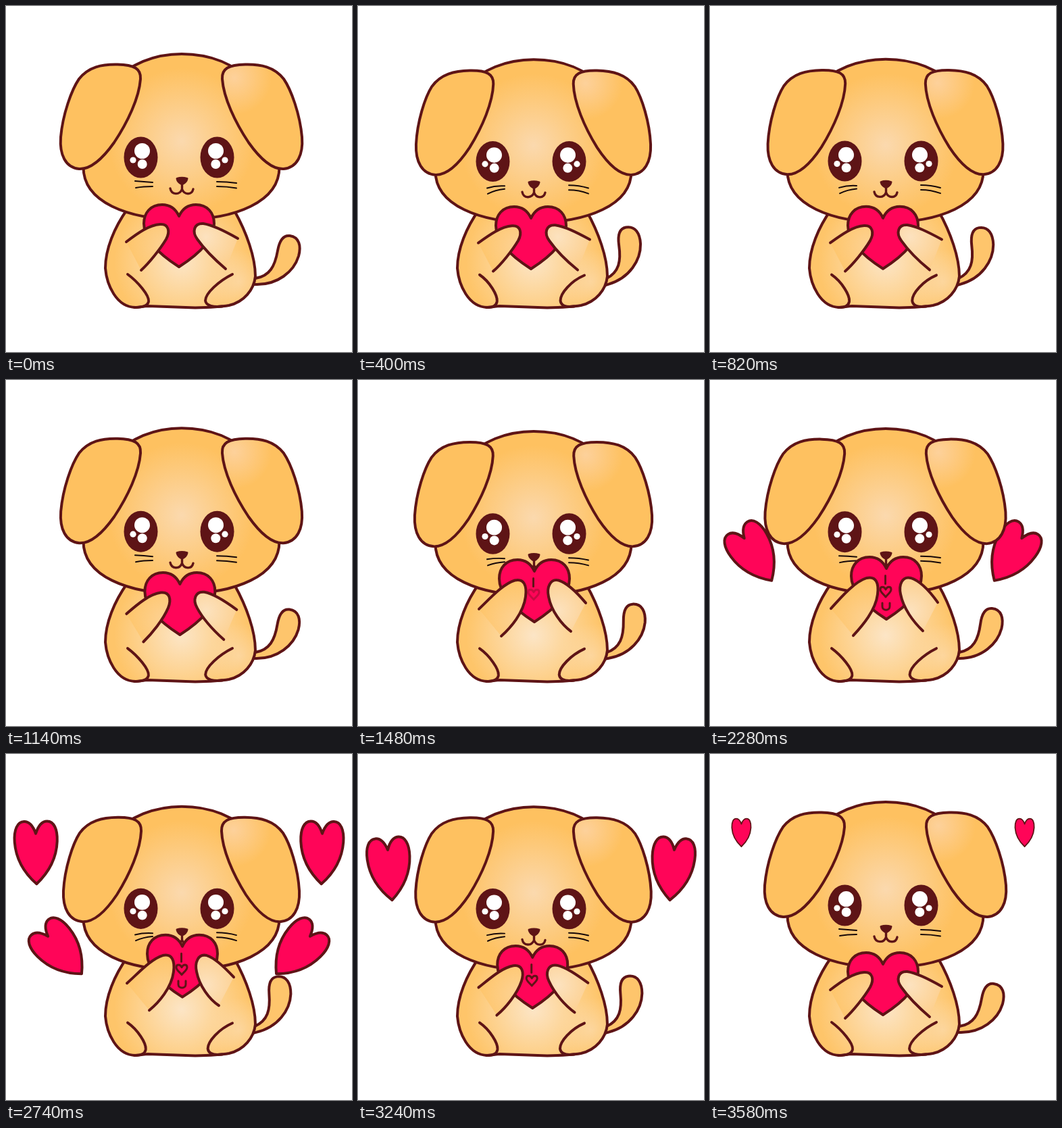
Write an HTML page with a canvas that moves like this. It is 512 by 512 pixels and loops after 3600 ms.

```html
<!DOCTYPE html>
<html lang="en">
<head>
<meta charset="utf-8">
<title>Puppy with a heart</title>
<style>
html, body { margin: 0; width: 100%; height: 100%; overflow: hidden; background: #fff; }
canvas { display: block; width: 100vw; height: 100vh; }
</style>
</head>
<body>
<canvas id="stage" width="512" height="512"></canvas>
<script>
const ctx = document.getElementById('stage').getContext('2d');
const LOOP = 3600, BOB = 1200;
const LINE = '#5e1416', PINK = '#ff0558', FUR = '#fec160', PALE = '#fbd9ae';

const clamp = v => Math.min(1, Math.max(0, v));
const ramp = (t, a, b) => clamp((t - a) / (b - a));
const ease = u => (1 - Math.cos(Math.PI * u)) / 2;
const mix = (a, b, u) => a + (b - a) * u;

function glow(x, y, r, inner = PALE, outer = FUR) {
  const g = ctx.createRadialGradient(x, y, 0, x, y, r);
  g.addColorStop(0, inner);
  g.addColorStop(1, outer);
  return g;
}

function draw(path, fill, width = 4, color = LINE) {
  const p = typeof path === 'string' ? new Path2D(path) : path;
  if (fill) { ctx.fillStyle = fill; ctx.fill(p); }
  if (width) { ctx.strokeStyle = color; ctx.lineWidth = width; ctx.stroke(p); }
}

function group(paint) {
  ctx.save();
  paint();
  ctx.restore();
}

function mirror(axis) {
  ctx.translate(axis * 2, 0);
  ctx.scale(-1, 1);
}

function dot(x, y, rx, ry, color) {
  ctx.fillStyle = color;
  ctx.beginPath();
  ctx.ellipse(x, y, rx, ry, 0, 0, Math.PI * 2);
  ctx.fill();
}

// Flying hearts: progress, x, y of the centre
const TRACK = [[0, 104, 345], [0.283, 81, 291], [0.4, 66, 258], [0.7, 46.5, 170],
               [0.783, 44.5, 146], [0.88, 46, 124], [1, 46.5, 115]];
const FLYER = new Path2D('M0,-28C-4,-40 -9,-46 -17,-46C-27,-46 -32.5,-34 -31.5,-16C-30,10 -17,31 0,46.5' +
                         'C17,31 30,10 31.5,-16C32.5,-34 27,-46 17,-46C9,-46 4,-40 0,-28Z');

function flyingPair(p) {
  if (p < 0 || p >= 1) return;
  const i = Math.max(1, TRACK.findIndex(k => k[0] > p));
  const a = TRACK[i - 1], b = TRACK[i], u = ramp(p, a[0], b[0]);
  const tilt = 46 * (1 - ease(ramp(p, 0.15, 0.85))) * Math.PI / 180;
  const size = ease(ramp(p, 0, 0.25)) * mix(1, 0.4, ramp(p, 0.8, 1));
  for (const flip of [false, true]) group(() => {
    if (flip) mirror(256);
    ctx.translate(mix(a[1], b[1], u), mix(a[2], b[2], u));
    ctx.rotate(-tilt);
    ctx.scale(size, size);
    draw(FLYER, PINK);
  });
}

function tail(b) {
  group(() => {
    ctx.translate(369, 408);
    ctx.rotate(-24 * b * Math.PI / 180);
    ctx.translate(-369, -408);
    draw('M355,404L369,403C390,400 398,385 402,362C405,345 412,339 420,340' +
         'C434,342 437,355 433,370C426,393 402,413 369,412L355,412', '#fec56c');
  });
}

const TORSO = new Path2D('M180,300C160,328 147,360 147,388C149,412 163,446 192,446C200,446 204,444 210,444' +
                         'L280,446.5C300,446 318,445 330,443C352,438 367,420 369,400C369,372 356,335 338,303Z');

function body(b) {
  draw(TORSO, glow(260, 378, 100, '#fce5c6', '#fec56a'), 0);
  draw(TORSO, glow(345, 408, 48, '#fcdcb0b0', '#fcdcb000'));
  const l = 211 - 7 * b, r = 295 + 6 * b;
  draw(`M180,${397 + b}C195,408 ${l + 1},428 ${l},437C${l - 1},444 200,446 190,446`);
  draw(`M335,${397 + 2 * b}C315,407 ${r},425 ${r},436C${r + 1},444 308,446 320,444.5`);
}

function ear(b, fill) {
  group(() => {
    ctx.translate(190 + b, 95);
    ctx.rotate(-0.055 * b);
    ctx.translate(-190, -95);
    draw('M165,86.5C190,87 200,93 199,108C197,136 180,172 160,202C143,226 125,242 108,241' +
         'C88,239 79,220 81,194C84,160 97,124 108,108C122,90 142,86 165,86.5Z', fill);
  });
}

function eye() {
  dot(199.5, 224, 25, 30.5, LINE);
  dot(201.5, 214.5, 11.5, 11.5, '#fff');
  dot(188, 228, 4.6, 4.6, '#fff');
  dot(201.7, 234, 7, 7, '#fff');
}

function head(b) {
  group(() => {
    ctx.translate(0, 315 + 6 * b);
    ctx.scale(1, 1 - 0.0204 * b);
    ctx.translate(0, -315);
    draw('M114.5,238C114,130 179,71 260,71C345,71 405,130 404.5,238C405,290 339,316 259.5,316' +
         'C180,316 114,290 114.5,238Z', glow(260, 200, 108));
    ear(b, FUR);
    group(() => { mirror(259.5); ear(b, glow(181, 106, 55, '#fdd19b')); });
    eye();
    group(() => { mirror(256); eye(); });
    draw(`M191,${259 + 7 * b}Q204,260 217,261M192,${269 + 5 * b}Q203,267 217,${267 - 2 * b}` +
         `M312,260Q327,260 341,${262 + 3 * b}M312,267Q327,267 341,${269.5 + 4 * b}`, null, 2, '#160808');
    draw('M253,255.5Q260,253 268,255.5Q267,261 260.5,264Q254,261 253,255.5Z', LINE, 3);
    draw('M260.5,263V272M243,270C245,280 257,280 260.5,271C264,280 275,280 277,271', null, 3.4);
  });
}

const HEART = new Path2D('M0,0C-5,-11 -14,-17 -25,-17C-42,-17 -52,-5 -52,11C-52,38 -22,61 0,75' +
                         'C22,61 52,38 52,11C52,-5 42,-17 25,-17C14,-17 5,-11 0,0Z');
// Marks inside the heart: shape, fade in, fade out
const MARKS = [
  ['M-1.5,10.5V22.5', 1320, 1440, 3380, 3480],
  ['M-1,31C-3,26 -9,26 -9,31C-9,35 -4,38 -1,42C2,38 7,35 7,31C7,26 1,26 -1,31Z', 1440, 1560, 3260, 3360],
  ['M-6,51V56C-6,63 5,63 5,56V51', 1560, 1680, 3090, 3210]
];

function heldHeart(t, b, lift) {
  group(() => {
    ctx.translate(mix(256, 261, lift), mix(311 + 4 * b, 278 + 11 * b, lift));
    draw(HEART, PINK);
    for (const [path, in0, in1, out0, out1] of MARKS) {
      ctx.globalAlpha = ramp(t, in0, in1) * (1 - ramp(t, out0, out1));
      draw(path, null, 3);
    }
  });
}

// Ten points per paw: start, three curves
const PAWS = [
  { low: [178,349, 195,336, 212,324, 228,323, 241,322, 243,334, 237,345, 228,360, 212,380, 200,391],
    high: [179,338, 196,318, 215,297, 232,292, 246,289, 250,300, 248,316, 245,340, 226,362, 212,378],
    fill: () => glow(236, 356, 58, '#fdd294', '#fec56a') },
  { low: [343,344, 322,332, 306,324, 292,322, 278,321, 275,334, 283,345, 295,362, 311,377, 325,389],
    high: [337,329, 324,310, 310,296, 297,292, 284,289, 279,303, 282,316, 286,337, 301,357, 315,371],
    fill: () => glow(296, 342, 66, '#fce2bf', '#fdca80') }
];

function paw({ low, high, fill }, b, lift) {
  const last = low.length - 2;
  const v = low.map((n, i) => {
    const isEnd = i < 2 || i >= last;
    const sway = i % 2 ? b * (isEnd ? 2 : 3 + 7 * lift) : 0;
    return mix(n, high[i], lift) + sway;
  });
  const p = new Path2D();
  p.moveTo(v[0], v[1]);
  for (let i = 2; i < v.length; i += 6) p.bezierCurveTo(...v.slice(i, i + 6));
  draw(p, fill());
}

function render(t) {
  const b = (1 - Math.cos(2 * Math.PI * t / BOB)) / 2;
  const lift = ease(ramp(t, 1000, 1400)) * (1 - ease(ramp(t, 3000, 3450)));
  ctx.fillStyle = '#fff';
  ctx.fillRect(0, 0, 512, 512);
  ctx.lineCap = ctx.lineJoin = 'round';
  flyingPair((t - 1800) / 1200);
  flyingPair((t - 2400) / 1200);
  tail(b);
  body(b);
  head(b);
  heldHeart(t, b, lift);
  PAWS.forEach(p => paw(p, b, lift));
}

const start = performance.now();
function tick() {
  render((performance.now() - start) % LOOP);
  requestAnimationFrame(tick);
}
tick();
</script>
</body>
</html>
```
